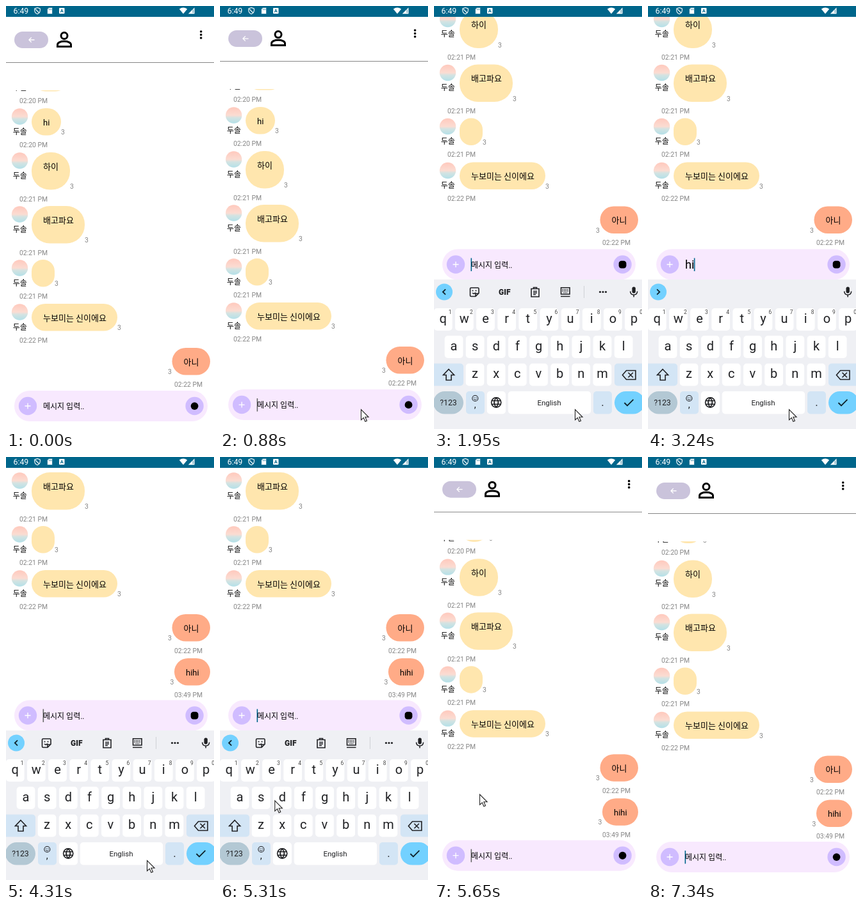
Write an HTML page that moves like this. It is 325 px wide and 662 px high and loops after 7740 ms.

```html
<!DOCTYPE html>
<html lang="ko">
<head>
<meta charset="utf-8">
<title>Chat</title>
<style>
html, body { margin: 0; width: 100%; height: 100%; overflow: hidden; background: #fff; }
svg { display: block; width: 100vw; height: 100vh; }
text { font-family: Roboto, "Noto Sans CJK KR", "Noto Sans CJK", sans-serif; }
.line { fill: none; stroke: #202124; stroke-width: 1.6; }
.mid { text-anchor: middle; }
.small { font-size: 10.4px; fill: #858585; }
</style>
</head>
<body>
<svg id="stage" viewBox="0 0 325 662" preserveAspectRatio="none"></svg>
<script>
const LOOP = 7740, PAN = 221.5, SCROLL = 67.5, TEAL = '#00668b', SKY = '#73d1ff', PALE = '#d3e5f5';

// ---- markup helpers
const rect = (x, y, w, h, r, fill, more = '') =>
  `<rect x="${x}" y="${y}" width="${w}" height="${h}" rx="${r}" fill="${fill}" ${more}/>`;
const circle = (x, y, r, fill, more = '') =>
  `<circle cx="${x}" cy="${y}" r="${r}" fill="${fill}" ${more}/>`;
const path = (d, more = 'class="line"') => `<path d="${d}" ${more}/>`;
const text = (x, y, s, size, more = '') =>
  `<text x="${x}" y="${y}" font-size="${size}" ${more}>${s}</text>`;
const small = (x, y, s) => `<text x="${x}" y="${y}" class="small">${s}</text>`;

// ---- chat list: text, bubble width, tall flag, time, own message
const messages = [
  ['하이', 59, 0, '02:20'],
  ['hi', 46, 0, '02:20'],
  ['하이', 60, 1, '02:21'],
  ['배고파요', 83, 1, '02:21'],
  ['', 36, 0, '02:21'],
  ['누보미는 신이에요', 134, 0, '02:22'],
  ['아니', 59.5, 0, '02:22', 1],
  ['hihi', 56, 0, '03:49', 1]
];

function messageList() {
  let y = 91, out = '';
  messages.forEach(([s, w, tall, time, own], i) => {
    const h = tall ? 58.5 : 42.5, x = own ? 319 - w : 40;
    let item = rect(x, y, w, h, Math.min(w, h, 57) / 2, own ? '#ffab87' : '#ffe6ae')
      + text(x + 18, y + 26.7, s, 13)
      + small(own ? x - 6.5 : x + w, y + h - 1.5, '3')
      + small(own ? 263 : 21, y + h + 18, time + ' PM');
    if (!own) item += circle(21.5, y + 13, 12.7, 'url(#photo)')
      + text(21.8, y + 40.5, '두솔', 12, 'class="mid"');
    out += i === 7 ? `<g id="sent">${item}</g>` : item;
    y += tall ? 84 : 69;
  });
  return out;
}

function header() {
  return rect(13, 40, 53, 26, 13, '#cac3db')
    + path('M44.5 53H36M39.7 49.2L35.9 53L39.7 56.8', 'fill="none" stroke="#fff" stroke-width="1.3"')
    + circle(91, 46.5, 5, 'none', 'stroke="#000" stroke-width="3"')
    + path('M80.5 63.5V60.5C80.5 53.5 101.5 53.5 101.5 60.5V63.5Z', 'fill="none" stroke="#000" stroke-width="3"')
    + [40, 45, 50].map(y => circle(304.7, y, 1.8, '#000')).join('')
    + rect(0, 88, 325, 1, 0, '#858585');
}

function inputBar() {
  return rect(13, 602, 302, 48, 24, '#f8e9fe')
    + circle(34, 626, 14.2, '#d0bcff')
    + path('M29.5 626H38.5M34 621.5V630.5', 'stroke="#fff" stroke-width="1.3"')
    + circle(294.6, 626, 14.2, '#d0bcff')
    + rect(288.7, 620.2, 11.8, 11.8, 5.9, '#000', 'id="dot"')
    + text(58, 631, '메시지 입력..', 12, 'id="hint"')
    + text(58, 632.5, '', 18, 'id="typed"')
    + rect(57.5, 616, 1.6, 20.5, 0, TEAL, 'id="caret"');
}

function statusBar() {
  return rect(0, 0, 325, 17, 0, TEAL)
    + text(11.5, 12, '6:49', 12.3, 'fill="#fff"')
    + path('M49 2.5L53.3 4.2V7Q53 11 49 12.5Q45 11 44.7 7V4.2ZM46 5L52 11', 'fill="none" stroke="#fff" stroke-width="1.1"')
    + path('M67 2.5H72.5V12.5H64.5V5ZM67.2 4.3V6.4M69 4.3V6.4M70.8 4.3V6.4', `fill="#fff" stroke="${TEAL}" stroke-width=".7"`)
    + rect(83, 3, 8.5, 9, 1, '#fff')
    + text(87.2, 10.2, 'A', 7.5, `class="mid" font-weight="700" fill="${TEAL}"`)
    + path('M270.8 4.8Q277 0 283.2 4.8L277 12.3Z', 'fill="#fff"')
    + path('M294.5 2.5V12.2H284.8Z', 'fill="#fff"')
    + path('M292.3 5.5V11', `stroke="${TEAL}" stroke-width=".8"`);
}

// ---- on-screen keyboard
function keyRow(letters, x0, y, digits) {
  return [...letters].map((c, i) => {
    const x = x0 + i * 33.15;
    return rect(x - 14.4, y, 28.8, 35, 5, '#fff')
      + text(x, y + 22.8, c, 20, 'class="mid" fill="#202124"')
      + (digits ? text(x + 11, y + 9, (i + 1) % 10, 8.5, 'class="mid" fill="#444"') : '');
  }).join('');
}

function toolIcons() {
  return path('M58 441H68.5Q70 441 70 442.5V449.5L65 454.5H58Q56.5 454.5 56.5 453V442.5Q56.5 441 58 441ZM65 454V450H70M60 449Q62.5 451.5 65 448.5')
    + circle(60.5, 445.5, 1, '#202124') + circle(65.5, 445.5, 1, '#202124')
    + text(110.3, 451.6, 'GIF', 12, 'class="mid" font-weight="900" fill="#202124"')
    + path('M152 442.5H164V455H152ZM155.5 442.5V440.5H160.5V442.5M155 446.5H161M155 449H161M155 451.5H159')
    + path('M198.5 440.8H212V451H198.5ZM198 454.5H212.5')
    + path('M200.5 443.6H210.5M200.5 446H210.5M202.5 448.6H208.5', 'stroke="#202124" stroke-width="1.3" stroke-dasharray="1.5 1"')
    + rect(234, 438, 1, 19, 0, '#cfd1d6')
    + [259.5, 264, 268.5].map(x => circle(x, 447.5, 1.6, '#202124')).join('');
}

function keyboard() {
  return rect(0, 428, 325, 310, 0, '#eff0f4')
    + circle(16, 447.5, 13, SKY)
    + path('', 'id="chevron" fill="none" stroke="#10222c" stroke-width="1.8"')
    + `<g id="tools">${toolIcons()}</g>`
    + rect(309.5, 439.5, 5.4, 10, 2.7, '#202124')
    + path('M306.7 446.5Q307 452 312.2 452Q317.4 452 317.7 446.5M312.2 452V455.5')
    + keyRow('qwertyuiop', 14.2, 473, true)
    + keyRow('asdfghjkl', 31, 516)
    + rect(-4, 559.5, 50, 35, 5, PALE)
    + keyRow('zxcvbnm', 64, 559.5)
    + rect(282, 559.5, 50, 35, 5, PALE)
    + path('M23 568.5L31.5 577.5H27V585.5H19V577.5H14.5Z')
    + path('M300.5 570.5H315V584.5H300.5L294.5 577.5ZM303.5 573.8L311 581.2M311 573.8L303.5 581.2')
    + rect(-1, 603, 47, 35.5, 17.7, '#b3c8d4')
    + text(22.5, 625, '?123', 12.3, 'class="mid" fill="#202124"')
    + rect(50, 603, 29, 35.5, 5, PALE)
    + circle(64.3, 614, 4.5, 'none', 'stroke="#202124" stroke-width="1.1"')
    + circle(62.7, 613, .7, '#202124') + circle(65.9, 613, .7, '#202124')
    + path('M62 615.3Q64.3 617.8 66.6 615.3', 'fill="none" stroke="#202124"')
    + text(64.3, 629, ',', 15, 'class="mid" fill="#202124"')
    + rect(82.7, 603, 29.3, 35.5, 5, '#fff')
    + circle(97.2, 620.5, 7.6, 'none', 'class="line"')
    + path('M90.3 617.7H104M90.3 623.3H104M97.2 613Q90.8 620.5 97.2 628Q103.6 620.5 97.2 613')
    + rect(115.8, 603, 129.4, 35.5, 5, '#fff')
    + text(180, 624.6, 'English', 11.5, 'class="mid" fill="#202124"')
    + rect(249, 603, 29, 35.5, 5, PALE)
    + text(263.5, 626, '.', 17, 'class="mid" fill="#202124"')
    + rect(282, 603, 47, 35.5, 17.7, SKY)
    + path('M297.5 621L302 625.5L311.5 615.8', 'fill="none" stroke="#10222c" stroke-width="1.8"');
}

document.getElementById('stage').innerHTML = `
  <defs>
    <linearGradient id="photo" x1="0" y1="0" x2="0" y2="1">
      <stop offset="0" stop-color="#ffc9bd"/><stop offset=".5" stop-color="#fbdcd2"/>
      <stop offset=".65" stop-color="#d3e3e2"/><stop offset="1" stop-color="#b4e0e8"/>
    </linearGradient>
    <clipPath id="view"><rect y="132" width="325" height="470"/></clipPath>
  </defs>
  ${rect(0, 0, 325, 662, 0, '#000')}
  <g id="app">
    ${rect(0, 0, 325, 668, 0, '#fff')}
    <g clip-path="url(#view)"><g id="list">${messageList()}</g></g>
    ${header()}${inputBar()}
  </g>
  ${statusBar()}
  <g id="keys">${keyboard()}</g>
  ${path('M0 0V16.2L3.8 12.8L6.4 18.8L9 17.7L6.4 11.8H11.6Z', 'id="mouse" fill="#fff" stroke="#222" stroke-width="1.1"')}`;

// ---- motion
const el = {};
for (const node of document.querySelectorAll('#stage [id]')) el[node.id] = node;
const set = (id, name, value) => el[id].setAttribute(name, value);
const show = (id, on) => set(id, 'visibility', on ? 'visible' : 'hidden');
const clamp = u => Math.min(1, Math.max(0, u));
const ease = u => (1 - Math.cos(Math.PI * clamp(u))) / 2;
const lerp = (a, b, u) => a + (b - a) * u;
// the screen refreshes every 70 ms while something moves
const hold = (t, anchor) => anchor + Math.floor((t - anchor) / 70) * 70;

function panAt(t) {
  return t < 3000
    ? PAN * ease((hold(t, 1080) - 855) / 250)
    : PAN * (1 - ease((hold(t, 5510) - 5380) / 289));
}

function keysAt(t) {
  if (t < 3000) {
    const k = hold(t, 1080) - 870;
    return { shift: 66 * (1 - clamp(k / 283)), alpha: clamp(k / 100) };
  }
  const v = clamp((hold(t, 5510) - 5440) / 158);
  return { shift: 66 * v * v, alpha: clamp(1 - 1.4 * v * v) };
}

function mouseAt(t) {
  if (t < 400 || t >= 6940) return null;
  if (t < 5100) {
    const u = clamp((hold(t, 400) - 400) / 140);
    return [lerp(250, 220.5, u), lerp(651, 631.5, u)];
  }
  if (t < 6590) {
    const u = ease((hold(t, 5100) - 5030) / 350);
    return [lerp(220.5, 71.5, u), lerp(631.5, 528, u)];
  }
  const u = (hold(t, 6590) - 6520) / 420;
  return [lerp(71.5, 205, u), lerp(528, 664, u)];
}

function render(t) {
  const pan = panAt(t), keys = keysAt(t), mouse = mouseAt(t);
  const sent = t >= 4310, typing = t >= 2890 && !sent;
  const count = typing ? 1 + Math.min(3, Math.floor((t - 2890) / 210)) : 0;

  set('app', 'transform', `translate(0 ${-pan})`);
  set('list', 'transform', `translate(0 ${sent ? -SCROLL : 0})`);
  show('sent', sent);
  set('dot', 'rx', pan > 220 ? 4.2 : 5.9);

  show('hint', !typing);
  el.typed.textContent = 'hihi'.slice(0, count);
  const lit = (t >= 1950 && t < 2430) || (t >= 2890 && t < 3910)
    || (t >= 4840 && t < 5340) || (t >= 6320 && t < 6840) || t >= 7340;
  show('caret', t >= 870 && (lit || !typing));
  set('caret', 'x', 57.5 + [0, 9.9, 14.3, 24.2, 28.6][count]);
  set('caret', 'fill', lit ? TEAL : '#6a6a6a');

  set('keys', 'transform', `translate(0 ${keys.shift})`);
  set('keys', 'opacity', keys.alpha);
  const folded = typing || t >= 5380;
  show('keys', keys.alpha > 0);
  el.tools.style.display = folded ? 'none' : '';
  set('chevron', 'd', folded ? 'M14 443.3L18.2 447.5L14 451.7' : 'M18 443.3L13.8 447.5L18 451.7');

  show('mouse', mouse);
  if (mouse) set('mouse', 'transform', `translate(${mouse})`);
}

function tick() {
  render(performance.now() % LOOP);
  requestAnimationFrame(tick);
}
tick();
</script>
</body>
</html>
```
